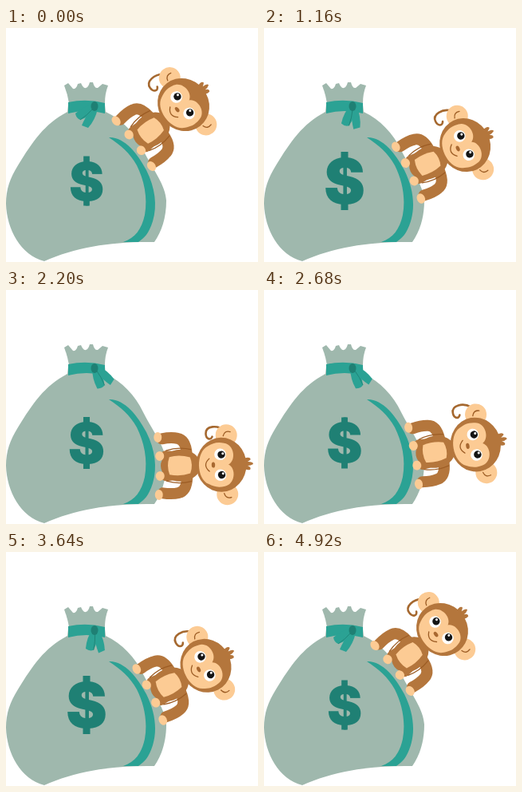
Recreate the animation shown at these times as an HTML page. Size 316 by 293 pixels, loop 4.96 s.

```html
<!DOCTYPE html>
<html lang="en">
<head>
<meta charset="utf-8">
<title>Monkey sliding on a money bag</title>
<style>
  html, body { margin: 0; width: 100%; height: 100%; overflow: hidden; background: #fff; }
  svg { display: block; width: 316px; height: 293px; }
  .bag { fill: #9fb8ad; }
  .teal { fill: #2ba294; }
  .dark { fill: #1f8074; }
  .fur { fill: #b4763c; }
  .skin { fill: #fccb94; }
  .limb { fill: none; stroke: #b4763c; stroke-width: 14; stroke-linecap: round; stroke-linejoin: round; }
  .line { fill: none; stroke: #9c5c24; stroke-width: 1.3; stroke-linecap: round; }
  text { font: 900 78px Inter, "Open Sans", sans-serif; text-anchor: middle; }
</style>
</head>
<body>
<svg viewBox="0 0 316 293">
  <defs>
    <!-- One side of the monkey; the other side is its mirror image -->
    <g id="ear">
      <circle class="skin" cx="7" cy="-37" r="13.5"/>
      <path class="line" d="M3-36Q5-43 12-41"/>
    </g>
    <g id="limbs">
      <path class="limb" d="M-43-14Q-44-32-54-34Q-62-36-74-34"/>
      <path class="limb" d="M-56-12L-70-13" style="stroke-width:12"/>
      <path class="line" d="M-38-20Q-54-24-69-19"/>
    </g>
    <g id="paws">
      <ellipse class="skin" cx="-79" cy="-36" rx="5" ry="6.5"/>
      <ellipse class="skin" cx="-77" cy="-12.5" rx="5.5" ry="6"/>
    </g>
    <g id="eye">
      <circle cx="-1.2" cy="-13" r="7.3" fill="#fff"/>
      <circle cx=".3" cy="-12.7" r="4.7" fill="#151515"/>
    </g>
  </defs>

  <path class="bag" d="M77 105C48 120 33 143 15 172C5 188 0 202 0 220C1 252 18 284 48 292C88 274 135 267 186 268C195 255 201 238 201 216C200 197 186 180 172 153C162 132 146 115 125 105L124 96H78Z"/>
  <path class="bag" d="M79 94Q77 82 73 72L78 69L84 76Q88 77 90 70L94 69Q97 76 100 75Q103 75 105 68L109 68Q111 76 115 75L121 70L128 72Q124 82 124 94Z"/>
  <path class="teal" d="M129 137C148 136 165 157 176 178C187 200 190 222 184 242C179 258 173 263 166 268H147C162 263 170 252 174 234C178 212 173 190 164 172C155 156 144 147 129 137Z"/>
  <path class="teal" d="M78 93Q101 88 124 94V107Q101 101 78 107Z"/>
  <g id="bow" class="teal">
    <path d="M0-3Q-14 0-24 9Q-23 15-18 17Q-6 13 2 4Z"/>
    <path d="M-3 1Q-12 14-16 24L-8 27Q1 17 4 3Z"/>
    <path d="M-2 3Q-9 11-18 17" fill="none" stroke="#1f8074" stroke-width=".8"/>
  </g>
  <ellipse class="dark" cx="111" cy="98" rx="4.5" ry="6"/>
  <g id="dollar" class="dark">
    <text y="28.4">$</text>
    <path d="M-4.5-36.5h9v10h-9zM-4.5 26.5h9v10h-9z"/>
  </g>

  <g id="monkey">
    <path id="tail" d="M4-45C-5-53-20-52-20-42C-20-35-14-33-12-38" fill="none" stroke="#a5682f" stroke-width="2.6" stroke-linecap="round"/>
    <ellipse class="fur" cx="-51" rx="25" ry="20"/>
    <use href="#limbs"/><use href="#limbs" transform="scale(1 -1)"/>
    <path class="skin" d="M-65-11Q-52-14-39-10Q-35 0-39 10Q-52 14-65 11Q-69 0-65-11Z"/>
    <use href="#paws"/><use href="#paws" transform="scale(1 -1)"/>

    <use href="#ear"/><use href="#ear" transform="scale(1 -1)"/>
    <path class="fur" d="M28-7Q36-10 37-6Q35-4 33-3Q40-3 40 0Q37 2 33 2Q38 4 36 7Q32 8 28 5Z"/>
    <ellipse class="fur" rx="31.5" ry="34"/>
    <path class="skin" d="M9 0C19-5 17-25 4-27C-5-29-10-27-16-24C-32-17-32 17-16 24C-10 27-5 29 4 27C17 25 19 5 9 0Z"/>
    <use href="#eye"/><use href="#eye" transform="scale(1 -1)"/>
    <circle cx="2" cy="-14" r="1.5" fill="#fff"/>
    <circle cx="2" cy="11" r="1.5" fill="#fff"/>
    <ellipse cx="-10" rx="2.2" ry="3.6" fill="#a86830"/>
    <path class="line" d="M-15-8Q-24 0-15 8"/>
  </g>
</svg>
<script>
  const LOOP = 4960, BOTTOM = 2240, PULSE = LOOP / 2;
  const place = (id, transform) => document.getElementById(id).setAttribute('transform', transform);
  const quad = (start, a, b, s) => start + a * s + b * s * s;
  const smooth = u => u * u * (3 - 2 * u);

  function draw(now) {
    const t = now % LOOP;

    // Slide down, then climb back a little more slowly
    const s = t < BOTTOM ? t / BOTTOM : (LOOP - t) / (LOOP - BOTTOM);
    const x = quad(222.5, 67, -19, s);
    const y = quad(96, 67, 59, s);
    const angle = quad(-38, 7.5, 30.5, s);
    place('monkey', `translate(${x} ${y}) rotate(${angle})`);

    const phase = t / PULSE;
    const wag = Math.sin(2 * Math.PI * phase);
    place('tail', `translate(${-2 * wag} ${-4 * wag})`);

    const swing = smooth(1 - Math.abs(1 - phase));
    place('bow', `translate(111 98) rotate(${-80 * swing})`);

    const grow = smooth(Math.abs(Math.sin(Math.PI * phase)));
    place('dollar', `translate(101 191.5) scale(${0.85 + 0.15 * grow})`);
  }

  function frame() {
    draw(performance.now());
    requestAnimationFrame(frame);
  }
  frame();
</script>
</body>
</html>
```
